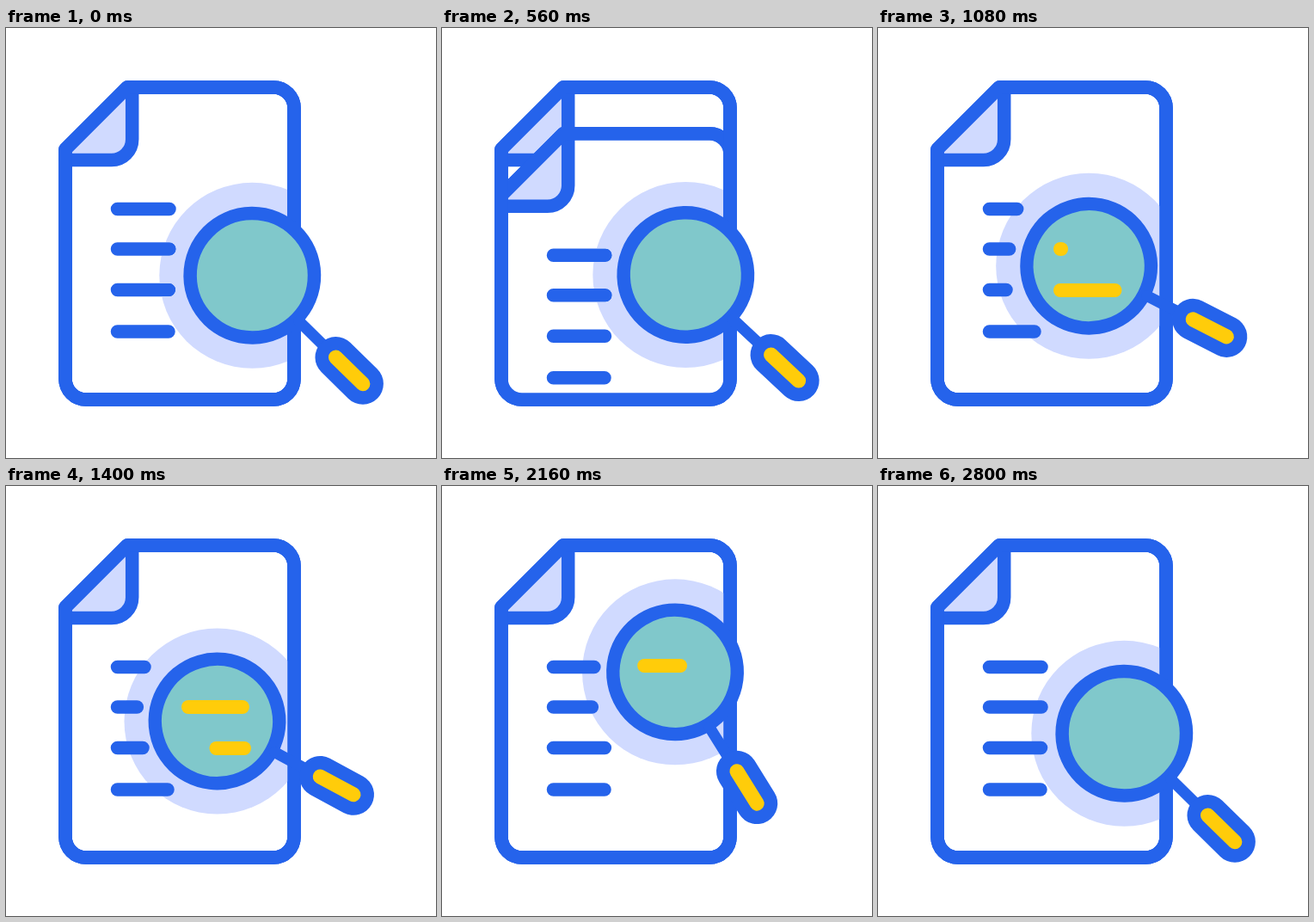
Animation, 500 px wide and 500 px high, one loop 3000 ms. Source, as an HTML page:

```html
<!DOCTYPE html>
<html lang="en">
<head>
<meta charset="utf-8">
<title>Document search</title>
<style>
  html, body { margin: 0; width: 100%; height: 100%; overflow: hidden; background: #fff; }
  svg { display: block; width: 100vw; height: 100vh; }
  .ink { fill: none; stroke: #2563eb; stroke-width: 15.5; stroke-linecap: round; stroke-linejoin: round; }
  .paper { fill: #fff; }
  .flap { fill: #d0daff; }
  .halo { fill: #d0daff; mix-blend-mode: darken; }
  .glass { fill: #80c8cb; }
  .mark { fill: none; stroke: #ffcc0a; stroke-width: 16; stroke-linecap: round; }
</style>
</head>
<body>
<svg viewBox="0 0 500 500">
  <defs>
    <path id="sheet" d="M141 69H311a24 24 0 0 1 24 24V408a24 24 0 0 1-24 24H93a24 24 0 0 1-24-24V141Z"/>
    <g id="page">
      <use href="#sheet" class="ink paper"/>
      <path class="flap" d="M141 69H146.7V129.5a24 24 0 0 1-24 24H69V141Z"/>
      <path class="ink" d="M146.7 69V129.5a24 24 0 0 1-24 24H69"/>
      <use href="#sheet" class="ink"/>
    </g>
    <clipPath id="inside"><use href="#sheet"/></clipPath>
    <clipPath id="view"><circle id="hole" r="66"/></clipPath>
  </defs>
  <use href="#page"/>
  <g clip-path="url(#inside)">
    <g id="text" class="ink"></g>
    <g id="old">
      <use href="#page"/>
      <path class="ink" d="M129.5 210.5H190M129.5 257H190M129.5 304.5H189.5M129.5 353H189"/>
    </g>
    <circle id="halo" class="halo" r="108"/>
  </g>
  <use href="#sheet" class="ink"/>
  <circle id="glass" class="glass" r="70"/>
  <g id="marks" class="mark" clip-path="url(#view)"></g>
  <g id="lens">
    <circle class="ink" r="72.2"/>
    <path class="ink" style="stroke-width:13" d="M76 0H124"/>
    <path class="ink" style="stroke-width:48" d="M136 0H180"/>
    <path class="mark" style="stroke-width:17" d="M136 0H180"/>
  </g>
</svg>
<script>
const LOOP = 3000, STEP = 40;
const $ = id => document.getElementById(id);
const cubic = u => u < .5 ? 4 * u ** 3 : 1 - 4 * (1 - u) ** 3;
const smooth = u => u * u * (3 - 2 * u);
const part = (t, a, b) => Math.min(1, Math.max(0, (t - a) / (b - a)));

// Keys are [time, ...values]; returns the values at t.
function tween(keys, t, ease) {
  let i = 0;
  while (i < keys.length - 2 && t > keys[i + 1][0]) i++;
  const [a, ...from] = keys[i], [b, ...to] = keys[i + 1];
  const p = ease(part(t, a, b));
  return from.map((v, k) => v + (to[k] - v) * p);
}

// time, x, y, angle
const lensKeys = [
  [320, 286.3, 287.8, 44.4], [1240, 244.3, 276.5, 26.8],
  [1945, 270, 211.5, 59], [2800, 286.3, 287.8, 44.4]
];

// Blue lines: time, right end
const lines = [
  { y: 210.5, keys: [[600, 190], [1160, 160], [1400, 161], [1800, 166], [2480, 186], [2720, 190]] },
  { y: 257, keys: [[600, 190], [1120, 152], [1800, 153], [2440, 189], [2720, 190]] },
  { y: 304.5, keys: [[600, 189.5], [1080, 149], [1400, 159], [1800, 184], [2200, 189.5]] },
  { y: 353, keys: [[600, 189], [980, 181], [1080, 182], [1400, 188], [1800, 189]] }
];

// Yellow lines: left end, start of entry, start of exit
const marks = [
  { y: 209, x: 232, enter: 1400, leave: 2030 },
  { y: 257, x: 212, enter: 1000, leave: 1510 },
  { y: 305, x: 212, enter: 670, leave: 1150 }
];

function addPaths(list, parent) {
  for (const item of list) {
    item.el = document.createElementNS("http://www.w3.org/2000/svg", "path");
    parent.append(item.el);
  }
}
addPaths(lines, $("text"));
addPaths(marks, $("marks"));

function draw(t) {
  const [x, y, angle] = tween(lensKeys, t, cubic);
  for (const id of ["halo", "glass", "hole"]) {
    $(id).setAttribute("cx", x);
    $(id).setAttribute("cy", y);
  }
  $("lens").setAttribute("transform", `translate(${x} ${y}) rotate(${angle})`);

  // The front page drops away, then the loop ends on an identical one.
  const drop = 363 * cubic(part(t, 320, 1040));
  $("old").setAttribute("transform", `translate(0 ${drop})`);
  $("old").style.display = t < 1040 ? "" : "none";

  for (const l of lines) {
    l.el.setAttribute("d", `M129.5 ${l.y}H${tween(l.keys, t, smooth)[0]}`);
  }
  for (const m of marks) {
    const at = start => m.x + (277 - m.x) * cubic(part(t, start, start + 500));
    m.el.setAttribute("d", `M${at(m.leave)} ${m.y}H${at(m.enter) + .01}`);
    m.el.style.display = t > m.enter && t < m.leave + 500 ? "" : "none";
  }
}

function tick() {
  draw(Math.floor(performance.now() % LOOP / STEP) * STEP);
  requestAnimationFrame(tick);
}
tick();
</script>
</body>
</html>
```
